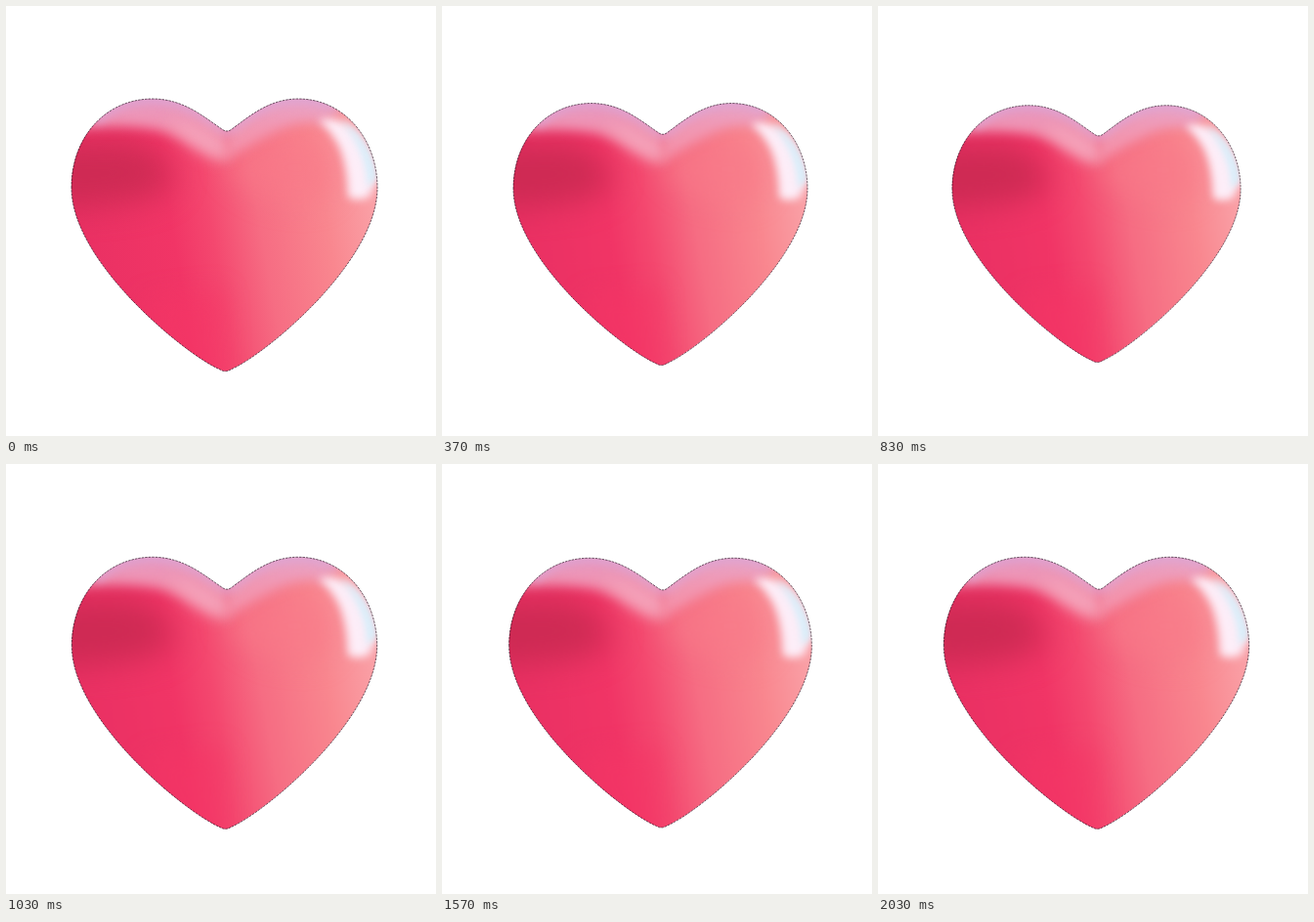
An HTML page with a canvas that plays this animation: 440x440 px, repeating every 2.06 s.

```html
<!DOCTYPE html>
<html lang="en">
<head>
<meta charset="utf-8">
<title>Beating heart</title>
<style>
  html, body { margin: 0; width: 100%; height: 100%; overflow: hidden; background: #fff; }
  canvas { display: block; width: 440px; height: 440px; }
</style>
</head>
<body>
<canvas id="stage" width="440" height="440"></canvas>
<script>
const SIZE = 440, LOOP = 2060, BEAT = 15, FALL = 7, DEPTH = 0.077;
const CX = 223.5, CY = 213;
const ctx = document.getElementById('stage').getContext('2d');

const heart = new Path2D('M67 186 C67 134 102 95 150 95 C182 95 203 114 221 126 Q226 130 231 126 ' +
  'C250 112 270 95 299 95 C346 95 380 136 380 186 ' +
  'C380 262 265 357 230 372 Q224.5 375.5 219 372 C184 357 67 262 67 186 Z');
const crest = 'M92 119 C108 103 128 95 150 95 C182 95 203 114 221 126 Q226 130 231 126 ' +
  'C250 112 270 95 299 95 C314 95 328 99 340 107';

function ramp(g, x0, y0, x1, y1, stops) {
  const grad = g.createLinearGradient(x0, y0, x1, y1);
  stops.forEach(([at, color]) => grad.addColorStop(at, color));
  return grad;
}

function soft(g, path, fill, blur, alpha = 1) {
  g.filter = `blur(${blur}px)`;
  g.globalAlpha = alpha;
  g.fillStyle = fill;
  g.fill(new Path2D(path));
}

function rim(g, path, color, width, blur, alpha) {
  g.filter = `blur(${blur}px)`;
  g.globalAlpha = alpha;
  g.strokeStyle = color;
  g.lineWidth = width;
  g.stroke(new Path2D(path));
}

// Glossy shading, painted once and clipped to the heart when drawn
function paintGloss() {
  const c = document.createElement('canvas');
  c.width = c.height = SIZE;
  const g = c.getContext('2d');

  g.fillStyle = ramp(g, 70, 250, 375, 198, [
    [0, '#e93063'], [0.33, '#f13566'], [0.46, '#f4486f'],
    [0.62, '#f66d83'], [0.84, '#f9878f'], [1, '#faa0a6']
  ]);
  g.fillRect(0, 0, SIZE, SIZE);

  // Crimson shade on the left lobe
  soft(g, 'M40 140 L130 138 C155 148 172 162 172 178 C160 198 120 206 40 206 Z', '#c92a52', 16, 0.85);
  // Warm glow below the dip
  soft(g, 'M222 158 C255 140 290 125 320 130 C340 150 345 190 320 200 C280 205 240 190 222 158 Z', '#f97a89', 14, 0.6);
  // Saturated foot
  soft(g, 'M140 300 L222 290 L226 385 L180 385 Z', '#f53666', 12, 0.5);

  // Pale bands along the top of both lobes
  const band = ramp(g, 0, 95, 0, 158, [[0, '#e6a6cd'], [0.45, '#f19cb8'], [1, '#f695ab']]);
  soft(g, 'M50 127 L98 124 C125 122 155 125 178 134 C198 142 212 153 226 158 L226 80 L50 80 Z', band, 6, 0.9);
  soft(g, 'M226 158 C246 145 268 130 292 122 C305 118 318 118 330 122 L345 80 L226 80 Z', band, 6, 0.9);
  // Bloom on the left slope of the dip
  soft(g, 'M165 118 C190 122 210 132 224 144 L224 158 C204 156 182 142 165 118 Z', '#f6adc2', 8, 0.75);
  rim(g, crest, '#d8a8de', 8, 4, 0.6);

  // Window reflection on the right lobe
  soft(g, 'M320 117 C330 113 346 117 358 127 C371 141 379 160 379 178 L372 195 ' +
    'C364 199 355 199 350 195 C350 174 346 150 337 137 C332 129 326 122 320 117 Z', '#fdf1fb', 4, 0.97);
  soft(g, 'M342 116 C360 126 376 146 380 176 L370 186 C370 158 358 136 342 116 Z', '#d3f0fc', 3.5, 0.9);
  return c;
}

function ease(u) {
  const half = v => Math.pow(2 * v, 2.3) / 2;
  return u < 0.5 ? half(u) : 1 - half(1 - u);
}

function beatScale(step) {
  const p = step % BEAT;
  const squeeze = p < FALL ? ease(p / FALL) : 1 - ease((p - FALL) / (BEAT - FALL));
  return 1 - DEPTH * squeeze;
}

const gloss = paintGloss();

function draw(ms) {
  // Thirty steps per second, on a 10 ms clock
  const step = Math.floor((Math.floor(ms / 10) + 0.5) * 0.3);
  const s = beatScale(step);
  ctx.fillStyle = '#fff';
  ctx.fillRect(0, 0, SIZE, SIZE);
  ctx.save();
  ctx.translate(CX, CY);
  ctx.scale(s, s);
  ctx.translate(-CX, -CY);
  ctx.save();
  ctx.clip(heart);
  ctx.drawImage(gloss, 0, 0);
  ctx.restore();
  ctx.strokeStyle = 'rgba(35, 10, 28, 0.8)';
  ctx.lineWidth = 0.8;
  ctx.setLineDash([2.5, 1]);
  ctx.stroke(heart);
  ctx.restore();
}

const start = performance.now();
function tick() {
  draw((performance.now() - start) % LOOP);
  requestAnimationFrame(tick);
}
tick();
</script>
</body>
</html>
```
